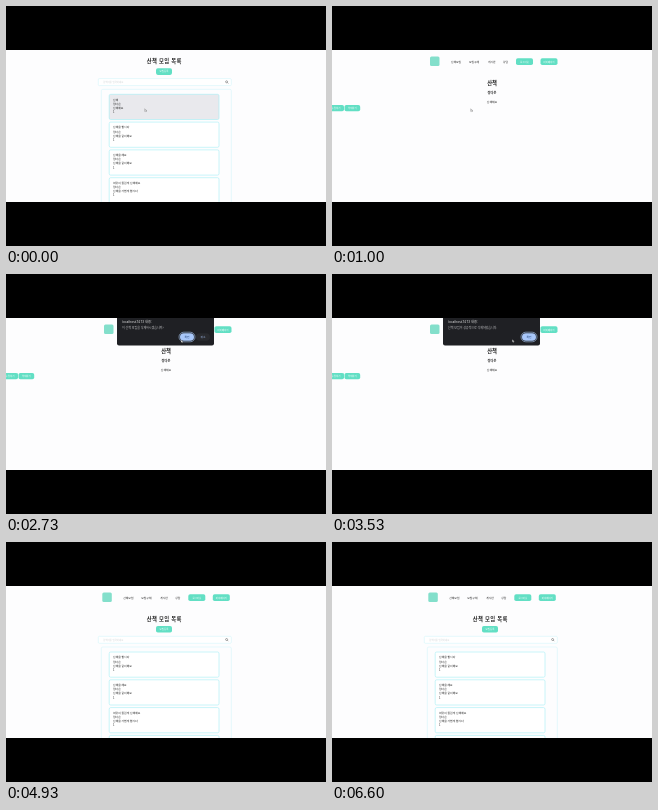
An HTML page that plays this animation: 320 by 240 pixels, repeating every 6.67 s.

```html
<!DOCTYPE html>
<html lang="ko">
<head>
<meta charset="utf-8">
<style>
  html, body { margin: 0; width: 100%; height: 100%; overflow: hidden; background: #000; }
  svg { display: block; }
  text { font-family: "Noto Sans CJK KR", "Noto Sans CJK", "Noto Sans", sans-serif; fill: #222; }
</style>
</head>
<body>
<svg id="stage" width="100%" height="100%" viewBox="0 0 320 240"></svg>
<script>
const LOOP = 6670;
const DETAIL = 800, CONFIRM = 2200, ALERT = 3300, RETURN = 4800;
const TEAL = '#62dfc4', HOST = 'localhost:5173 내용:', AUTHOR = '정다온';

const text = (x, y, size, s, attrs = '') =>
  `<text x="${x}" y="${y}" font-size="${size}" ${attrs}>${s}</text>`;
const mid = (x, y, size, s, attrs = '') =>
  text(x, y, size, s, `text-anchor="middle" ${attrs}`);
const box = (x, y, w, h, r, fill, attrs = '') =>
  `<rect x="${x}" y="${y}" width="${w}" height="${h}" rx="${r}" fill="${fill}" ${attrs}/>`;
const button = (x, y, w, h, label, id = '') =>
  box(x, y, w, h, 1.8, TEAL, id) + mid(x + w / 2, y + h / 2 + .9, 2.4, label, 'style="fill:#fff"');

const nav = x => `<g transform="translate(${x})">` +
  box(98, 50.5, 9.5, 9.5, 1.5, '#83dfcb') +
  [[119, '산책모임'], [137, '모임구해'], [156, '게시판'], [171, '상담']]
    .map(([tx, s]) => text(tx, 56.7, 2.75, s)).join('') +
  button(184, 52.3, 17, 6.7, '로그아웃') + button(208.5, 52.3, 17, 6.7, '마이페이지') + '</g>';

const card = (y, lines, id = '') =>
  box(103.2, y, 109.8, 25.2, 1.5, '#fff', `stroke="#a4eef5" stroke-width=".6" ${id}`) +
  lines.map((s, i) => text(107, y + 6.4 + i * 4.1, 2.8, s)).join('');

const cards = (from, items) => items.map((c, i) => card(from + i * 27.8, c)).join('');

const others = [
  ['산책을 합시다', AUTHOR, '산책을 같이해요', '1'],
  ['산책을 해요', AUTHOR, '산책을 같이해요', '1'],
  ['여럿이 즐겁게 산책해요', AUTHOR, '산책을 가볍게 합시다', '1'],
  ['산책 가요', AUTHOR, '산책해요', '1']
];

const list = nav(-1.7) +
  mid(158.2, 79, 5.3, '산책 모임 목록', 'font-weight="700" letter-spacing=".35"') +
  button(150, 84, 16, 6.6, '모임등록') +
  box(92.3, 94.3, 133, 7, 1, '#fff', 'stroke="#d3f5fa" stroke-width=".6"') +
  text(97, 98.8, 2.4, '검색어를 입력하세요', 'style="fill:#d0d4d6"') +
  '<path d="M221.3 98.2l1 1M221.6 97.5a1 1 0 1 1-2 0a1 1 0 1 1 2 0" fill="none" stroke="#555" stroke-width=".5"/>' +
  box(95.3, 105, 130, 130, 1.5, 'none', 'stroke="#d3f5fa" stroke-width=".6"');

const detail = nav(0) +
  mid(160, 79, 5.3, '산책', 'font-weight="700"') +
  mid(160, 88.2, 3.2, AUTHOR, 'font-weight="700"') +
  mid(160, 96.5, 2.8, '산책해요') +
  button(-4, 99, 16, 6.2, '수정하기') + button(12.5, 99, 15.7, 6.2, '삭제하기', 'id="remove"');

const pill = (x, label, main) =>
  (main ? box(x - 1, 58.2, 16, 9.6, 4.8, 'none', 'stroke="#a9c9f5" stroke-width=".6"') : '') +
  box(x, 59.2, 14, 7.6, 3.8, main ? '#a8c7fa' : '#292a2e') +
  mid(x + 7, 64, 2.7, label, `style="fill:${main ? '#173a70' : '#a8c7fa'}"`);
const dialog = (message, pills) =>
  '<path d="M111 44h97v25.5q0 2-2 2h-93q-2 0-2-2z" fill="#1f2024"/>' +
  text(116, 48.6, 3.25, HOST, 'style="fill:#eee"') +
  text(116, 54.6, 2.95, message, 'style="fill:#c8c8cb"') + pills;

const stage = document.getElementById('stage');
stage.innerHTML = `<svg y="44" width="320" height="152" viewBox="0 44 320 152">
  ${box(0, 44, 320, 152, 0, '#fdfdfe')}
  <g id="before" transform="translate(0 -21.7)">${list}
    ${card(110, ['산책', AUTHOR, '산책해요', '1'], 'style="fill:#e9e9ed"')}${cards(137.8, others)}</g>
  <g id="detail">${detail}</g>
  <g id="confirm">${dialog('이 산책 모임을 삭제하시겠습니까?', pill(174, '확인', true) + pill(190, '취소'))}</g>
  <g id="alert">${dialog('산책 모임이 성공적으로 삭제되었습니다.', pill(190, '확인', true))}</g>
  <g id="after">${list}${cards(110, others)}</g>
  <path id="cursor" d="M0 0v2.6l.7-.6l.5 1l.5-.3l-.5-.9h.9z" fill="#fff" stroke="#444" stroke-width=".3"/>
</svg>`;

// Pointer stops: time, x, y
const stops = [[0, 138.7, 102.8], [1150, 138.7, 102.8], [1800, 22.5, 101.5],
  [2250, 22.5, 101.5], [2650, 175, 66], [3350, 175, 66], [3900, 196, 64.5], [LOOP, 196, 64.5]];

function pointer(t) {
  const i = stops.findIndex(s => s[0] > t);
  const [a, b] = [stops[i - 1], stops[i]];
  const p = (t - a[0]) / (b[0] - a[0]), e = p * p * (3 - 2 * p);
  return [1, 2].map(k => a[k] + (b[k] - a[k]) * e);
}

const $ = id => document.getElementById(id);
const show = (id, on) => $(id).style.display = on ? '' : 'none';
const start = performance.now();

function frame() {
  const t = (performance.now() - start) % LOOP;
  show('before', t < DETAIL);
  show('detail', t >= DETAIL && t < RETURN);
  show('confirm', t >= CONFIRM && t < ALERT);
  show('alert', t >= ALERT && t < RETURN);
  show('after', t >= RETURN);
  show('cursor', t < RETURN);
  $('remove').style.fill = t > 1780 && t < CONFIRM ? '#4cc9ae' : TEAL;
  $('cursor').setAttribute('transform', `translate(${pointer(t)})`);
  requestAnimationFrame(frame);
}
frame();
</script>
</body>
</html>
```
